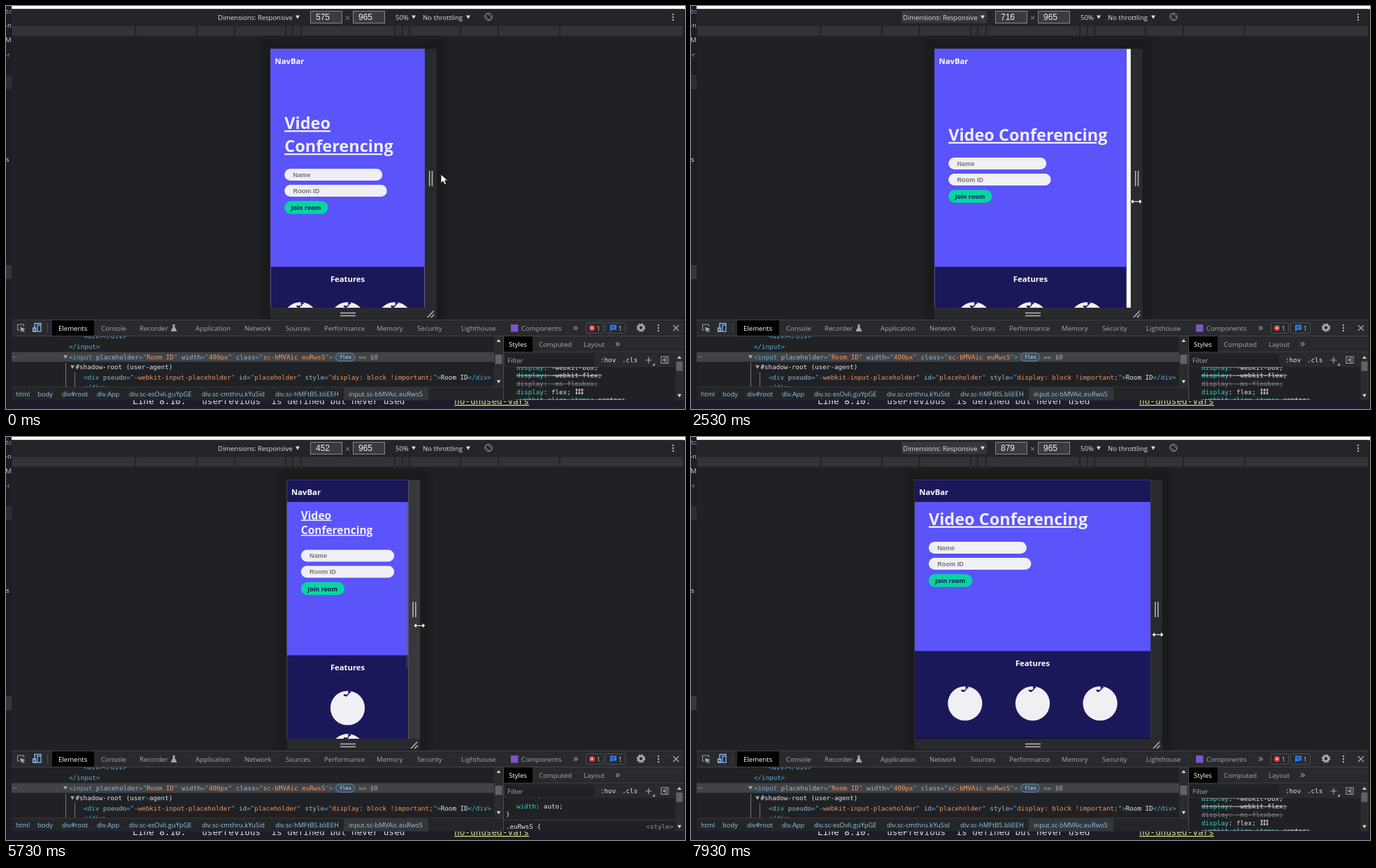
An HTML page for the animation above (8000 ms loop, 971 px wide and 577 px high).

```html
<!DOCTYPE html>
<html lang="en">
<head>
<meta charset="utf-8">
<title>Responsive resize</title>
<style>
html, body { margin: 0; width: 100%; height: 100%; overflow: hidden; background: #1e1c28; }
svg { display: block; width: 100vw; height: 100vh; }
text { white-space: pre; }
.ui { font: 9.6px "Open Sans", "Noto Sans", sans-serif; }
.bold { font: bold 11.3px "Open Sans", "Noto Sans", sans-serif; }
.code { font: 9.23px "DejaVu Sans Mono", monospace; }
.term { font: 12.7px "DejaVu Sans Mono", monospace; }
.field { font: 12px "Liberation Sans", Arial, sans-serif; }
.pill { font: bold 9.2px "Liberation Sans", Arial, sans-serif; }
.strike { text-decoration: line-through; }
</style>
</head>
<body>
<svg id="stage" viewBox="0 0 971 577" preserveAspectRatio="none">
  <defs>
    <filter id="soft" x="-10%" y="-10%" width="120%" height="120%"><feGaussianBlur stdDeviation="4"/></filter>
    <clipPath id="viewClip"><rect id="viewRect" y="61.5" height="370.5"/></clipPath>
    <clipPath id="treeClip"><rect x="8" y="473" width="690" height="72.5"/></clipPath>
    <clipPath id="paneClip"><rect x="712" y="517.5" width="246" height="46.5"/></clipPath>
    <clipPath id="edgeClip"><rect width="8" height="577"/></clipPath>
  </defs>
  <g id="back"></g>
  <g id="device">
    <rect id="shade" y="46" height="404" rx="6" fill="#000" opacity=".16" filter="url(#soft)"/>
    <rect id="bottomBar" y="432" height="15.5" fill="#292a2d"/>
    <rect id="sideBar" y="61.5" height="370.5" width="17"/>
    <path d="M478 439.5h22M478 443.5h22" stroke="#b9bbbe" stroke-width="1.5"/>
    <path id="grip" d="M6.8 236v22M10.7 236v22M4 446l9-9.500M9 446l4.500-4.500" stroke="#b9bbbe" stroke-width="1.5"/>
    <g clip-path="url(#viewClip)">
      <rect x="200" y="61" width="600" height="372" fill="#fff"/>
      <g id="page"></g>
    </g>
  </g>
  <g id="chrome"></g>
  <g id="cursor">
    <path id="arrow" d="M0 0v12.500l3-2.800 2.200 4.800 2.300-1-2.200-4.600h4.200z" fill="#fff" stroke="#111" stroke-width=".7"/>
    <path id="resize" d="M-8.500 0l4.500-4v3h8v-3l4.500 4-4.500 4v-3h-8v3z" fill="#fff" stroke="#111" stroke-width=".8"/>
    <circle id="touch" r="11" fill="#1f1f47" fill-opacity=".62" stroke="#8581c8" stroke-opacity=".8"/>
  </g>
</svg>
<script>
const $ = id => document.getElementById(id);
const esc = s => String(s).replace(/&/g, '&amp;').replace(/</g, '&lt;');
const rect = (x, y, w, h, fill, more = '') =>
  `<rect x="${x}" y="${y}" width="${w}" height="${h}" fill="${fill}" ${more}/>`;
const line = (d, color, w = 1, fill = 'none') =>
  `<path d="${d}" fill="${fill}" stroke="${color}" stroke-width="${w}"/>`;
const text = (x, y, s, fill = '#dfe1e5', cls = 'ui', more = '') =>
  `<text x="${x}" y="${y}" class="${cls}" fill="${fill}" ${more}>${esc(s)}</text>`;

const TAG = '#5db0d7', ATTR = '#9bbbdc', VAL = '#f29766', PROP = '#35d4c7', LIGHT = '#e4e6ea', DIM = '#8f9297';

// Parts alternate colour and string.
function code(x, y, ...parts) {
  let spans = '';
  for (let i = 0; i < parts.length; i += 2) spans += `<tspan fill="${parts[i]}">${esc(parts[i + 1])}</tspan>`;
  return `<text x="${x}" y="${y}" class="code">${spans}</text>`;
}
const attr = (name, value) => [ATTR, ' ' + name, TAG, '="', VAL, value, TAG, '"'];
const triangle = (x, y, s = 3, fill = '#dfe1e5') => `<path d="M${x - s} ${y - s * .8}h${s * 2}l${-s} ${s * 1.6}z" fill="${fill}"/>`;
const upArrow = (x, y) => `<path d="M${x - 3} ${y + 2}h6l-3-4z" fill="#d0d2d5"/>`;

function drawBack() {
  let s = rect(0, 0, 971, 577, '#1e1c28') + rect(0, 99, 8, 20, '#2c2c38') + rect(0, 371, 8, 20, '#34353d');
  s += '<g clip-path="url(#edgeClip)">' + text(0, 11, 'to', '#7fa8c8') + text(-1, 31, '-n', '#c8c8d0') +
    text(-1, 52, 'Mu', '#c8c8d0') + text(-1, 73, '-r', '#55c46a') + text(0, 223, 's', '#e8e8e8') + '</g>';
  s += text(181, 570, 'Line 8:10:', '#eceaf0', 'term', 'font-weight="bold"') +
    text(272.5, 570, "'usePrevious' is defined but never used", '#dddce4', 'term') +
    text(641, 570, 'no-unused-vars', '#dfe08c', 'term', 'text-decoration="underline"');
  s += rect(8, 0, 963, 4.5, '#fff') + rect(8, 4.5, 961, 560, '#202124') + rect(8, 4.5, 961, 23, '#242528') +
    rect(9, 28.5, 959, 14, '#333437');
  const ticks = [185.5, 273, 327, 400, 410, 422, 556, 567, 577, 650, 704, 792];
  s += line(ticks.map(x => `M${x} 29v13`).join(''), '#17181a', 1.2);
  s += `<rect id="dimHover" x="301" y="7" width="122" height="17.5" fill="#36373b"/>`;
  s += text(303, 19.7, 'Dimensions: Responsive', '#dfe1e5', 'ui', 'style="font-size:9.45px"') + triangle(417, 16);
  s += rect(435.5, 7.5, 45, 17, '#3a3b3e', 'stroke="#85878b"') + rect(496.5, 7.5, 45, 17, '#3a3b3e', 'stroke="#85878b"');
  s += '<text id="widthText" x="443" y="19.8" class="field" fill="#f1f1f1"></text>' + text(504, 19.8, '965', '#f1f1f1', 'field');
  s += line('M486 14.500l5 5M491 14.500l-5 5', '#a0a2a6');
  s += text(557, 19.7, '50%') + triangle(583, 16) + text(596, 19.7, 'No throttling') + triangle(661, 16);
  s += '<rect x="-4.500" y="-2.700" width="9" height="5.400" rx="1" fill="none" stroke="#85888c" transform="translate(690 15.500) rotate(45)"/>' +
    '<circle cx="690" cy="15.500" r="5.300" fill="none" stroke="#85888c"/>';
  s += dots(954, 16);
  $('back').innerHTML = s;
}

const dots = (x, y) => [-4, 0, 4].map(d => `<circle cx="${x}" cy="${y + d}" r="1.200" fill="#b4b6ba"/>`).join('');

function drawChrome() {
  let s = rect(8, 449, 961, 24, '#292a2d') + line('M8 449.500h961M8 472.500h961', '#4a4c50', .8) +
    rect(66, 450, 60, 22, '#000');
  s += line('M19.500 464h-3v-8h9v3', '#a4a6aa') + '<path d="M20 459.500l8 3-3.300 1.200 2 2.500-1.400 1-1.900-2.600-1.400 2.600z" fill="#a4a6aa"/>';
  s += line('M41 463v-8.500h9v2M38 466h6', '#8ab4f8', 1.4) + rect(45, 457, 5, 9, 'none', 'stroke="#8ab4f8" stroke-width="1.300"') +
    line('M38.500 465v-4h4v4z', '#8ab4f8', 1.3) + line('M59.500 454v14', '#4a4c50');
  const tabs = [['Console', 136], ['Recorder', 191], ['Application', 271], ['Network', 341], ['Sources', 400],
    ['Performance', 455], ['Memory', 530], ['Security', 588], ['Lighthouse', 651], ['Components', 737]];
  s += text(75, 464.8, 'Elements', '#fff') + tabs.map(([n, x]) => text(x, 464.8, n, '#a6a9ae')).join('');
  s += '<path d="M238 456.500h4M239 456.500v3l-3 6h8l-3-6v-3z" fill="#a6a9ae" stroke="#a6a9ae" stroke-width=".8"/>';
  s += rect(722, 456, 10.5, 10.5, '#7d55c7') + text(811, 465, '»', '#a6a9ae', 'ui', 'style="font-size:15px"');
  for (const x of [829.5, 857.5]) s += rect(x, 453.5, 28 - (x < 850 ? 3 : 0), 15, 'none', 'rx="2" stroke="#4c4e52"');
  s += '<circle cx="838" cy="461" r="4" fill="#e3403c"/>' + line('M836.500 459.500l3 3M839.500 459.500l-3 3', '#fff') +
    text(844.5, 464.8, '1', '#c3c5c9') + '<path d="M864 456.500h9v7h-6l-3 2.500z" fill="#2f7df4"/>' +
    line('M866 459h5M866 461h4', '#202124', .8) + text(875.5, 464.8, '1', '#c3c5c9');
  s += '<circle cx="908" cy="460.500" r="3.700" fill="none" stroke="#a6a9ae" stroke-width="2.800"/>' +
    '<circle cx="908" cy="460.500" r="5.500" fill="none" stroke="#a6a9ae" stroke-width="1.500" stroke-dasharray="2.500 1.820"/>' +
    dots(933, 461) + line('M954 457l8 8M962 457l-8 8', '#a6a9ae', 1.3);

  s += rect(8, 473, 703, 73, '#202124') + rect(8, 495.5, 690, 14, '#424346');
  s += '<g clip-path="url(#treeClip)">' + code(111, 476, TAG, '<div></div>') + code(90, 491, TAG, '</input>') +
    code(90, 505.7, TAG, '<input', ...attr('placeholder', 'Room ID'), ...attr('width', '400px'),
      ...attr('class', 'sc-bMVAic euRwsS'), TAG, '>') +
    code(99.5, 520.3, LIGHT, '#shadow-root (user-agent)') +
    code(111, 535, TAG, '<div', ...attr('pseudo', '-webkit-input-placeholder'), ...attr('id', 'placeholder'),
      ...attr('style', 'display: block !important;'), TAG, '>', LIGHT, 'Room ID', TAG, '</div>') +
    code(111, 549, TAG, '</div>') + line('M85.500 511v36M98.500 524v23', '#7f8287', .9) + '</g>';
  s += triangle(85, 502.5, 3, '#a6a9ae') + triangle(95, 517, 3, '#a6a9ae') + text(9, 504.5, '•••', '#a6a9ae', 'ui', 'style="font-size:6px"');
  s += rect(471.5, 497, 27, 11.5, '#3f5061', 'rx="5.700" stroke="#7199bb" stroke-width=".8"') +
    text(477, 505.3, 'flex', '#e3e6e9', 'code', 'style="font-size:7px"') +
    text(504, 505.7, '== $0', '#a9abaf', 'code', 'font-style="italic"');
  s += rect(698, 473, 13, 73, '#2b2c2f') + rect(699.5, 499, 10, 13.5, '#606266') + upArrow(704.5, 479) + triangle(704.5, 538, 2.7);
  s += rect(8, 546, 703, 18.5, '#242528') + rect(483, 546, 121, 18.5, '#34363a') + line('M8 545.700h703', '#3b3d41', .8);
  [['html', 14], ['body', 45], ['div#root', 80], ['div.App', 130], ['div.sc-esOvli.guYpGE', 176], ['div.sc-cmthru.kYuSid', 280],
    ['div.sc-hMFtBS.bliEEH', 385], ['input.sc-bMVAic.euRwsS', 490]].forEach(([n, x]) => { s += text(x, 558.8, n, '#8fc8ee', 'ui', 'style="font-size:9.400px"'); });

  s += rect(711, 473, 258, 91.5, '#202124') + rect(712, 473, 257, 22, '#292a2d') + rect(712, 473, 41, 22, '#000') +
    line('M711.500 473v91', '#4a4c50') + line('M712 495.500h257', '#45474b', .8);
  s += text(719, 487.6, 'Styles', '#fff') + text(762, 487.6, 'Computed', '#a6a9ae') + text(826, 487.6, 'Layout', '#a6a9ae') +
    text(871, 488, '»', '#a6a9ae', 'ui', 'style="font-size:15px"');
  s += rect(712, 497, 257, 20, '#292a2d') + rect(714, 498.5, 127, 17, '#202124') + text(717, 511, 'Filter', '#a6a9ae') +
    code(850, 510, LIGHT, ':hov') + code(881, 510, LIGHT, '.cls') + line('M914.500 507h9M919 502.500v9', '#a6a9ae', 1.2) +
    '<path d="M928 511v4h-4z" fill="#a6a9ae"/>' + rect(937, 502, 10, 9.5, 'none', 'stroke="#a6a9ae"') +
    line('M944 502v9.500', '#a6a9ae') + '<path d="M942.500 504v5.500l-3.500-2.700z" fill="#a6a9ae"/>';
  s += rect(957.5, 496, 11.5, 68.5, '#2b2c2f') + rect(958.5, 509, 9, 13.5, '#606266') + upArrow(963, 503) + triangle(963, 558, 2.7);
  const rule = (y, prop, val, cls = '', color) => `<g class="${cls}">` + code(730, y, color || PROP, prop, color || LIGHT, ': ' + val) +
    (cls ? line(`M730 ${y - 3}h${(prop.length + val.length + 2) * 5.56}`, color || LIGHT, .8) : '') + '</g>';
  s += '<g clip-path="url(#paneClip)"><g id="paneWide">' + rule(520.5, 'display', '-webkit-box;', 'x') +
    rule(532, 'display', '-webkit-flex;', 'x') + rule(544, 'display', '-ms-flexbox;', 'x', '#85888c') + rule(555.7, 'display', 'flex;') +
    line('M816 548v8M820 548v8M824 548v8', '#b3b5b9', 2.4) + line('M814 552h12', '#202124', 1) +
    rule(567, '-webkit-align-items', 'center;', 'x') + '</g>';
  s += '<g id="paneSmall">' + code(715, 517, LIGHT, '.bliEEH {') + rule(531.7, 'width', 'auto;') + code(715, 543, LIGHT, '}') +
    line('M712 548.500h246', '#45474b', .8) + code(715, 561, LIGHT, '.euRwsS {') + code(915.5, 561, DIM, '<style>') + '</g>';
  s += '<g id="paneInput">' + code(715, 521, LIGHT, '}') + line('M712 526.500h246', '#45474b', .8) + code(715, 537.3, LIGHT, 'input {') +
    text(837, 537.3, 'user agent stylesheet', DIM, 'code', 'font-style="italic"') +
    `<g font-style="italic">` + rule(551, '-webkit-writing-mode', 'horizontal-tb') + code(747, 562.3, LIGHT, '!important;') + '</g></g></g>';
  $('chrome').innerHTML = s;
}

// Linear keyframes given as [time, value] pairs.
function at(keys, t) {
  let i = keys.findIndex(k => k[0] > t);
  if (i < 0) return keys[keys.length - 1][1];
  if (!i) return keys[0][1];
  const [a, u] = keys[i - 1], [b, v] = keys[i];
  return u + (v - u) * (t - a) / (b - a);
}

const WIDTH = [[470, 575], [1333, 1121], [1700, 1277], [2200, 866], [2533, 716], [3000, 485], [3600, 452], [5930, 452],
  [6200, 448], [6500, 448], [7067, 751], [7333, 900], [7600, 1077], [7880, 879]];
const OFFSET = [[200, 12], [1333, 15], [2000, 10], [2533, 8], [3600, 12], [5733, 16], [7067, 17], [7880, 10.5]];
const CURSOR_Y = [[200, 247], [1333, 267], [2533, 280], [4000, 272], [4467, 279], [4800, 217], [4930, 220], [5070, 220],
  [5350, 201], [5733, 270], [7067, 283]];
const ROAM_X = [[4000, 587], [4200, 510], [4467, 480], [4800, 492], [4930, 499], [5350, 499], [5733, 591]];
const NAV = [[5130, 0], [5500, 1], [6600, 1], [6950, .25], [7067, .25], [7320, 1]];
const SCROLL = [[5070, 0], [5350, 19]];

const SCALE = .3836, MID = 488.5, BREAK = 480;
const BLUE = '#5a54fa', NAVY = '#1b1859', PALE = '#f0eff4';

function circle(x, y) {
  return `<g transform="translate(${x} ${y})"><circle r="24.600" fill="${PALE}"/>` +
    `<path d="M-4 -18.300q5.500 .8 6.500-5.400" fill="none" stroke="${NAVY}" stroke-width="1.500"/>` +
    `<path d="M-4.500 -18.500l2.600 .8M1.500 -23.300l2.200 .4" stroke="${NAVY}" stroke-width="2.400" stroke-linecap="round"/></g>`;
}

function drawPage(left, w, small, scroll, nav, t) {
  const one = w * .999 >= 268, x = left + 20, mid = left + w / 2;
  const top = small ? 331.5 : 373.5;
  const boxY = small ? 180.5 : one ? 217 : 233;
  const size = small ? 15.5 : 23.5;
  const title = (y, s) => text(x, y, s, PALE, 'bold', `style="font-size:${size}px" text-decoration="underline"`);
  let s = rect(left, 61, w, 600, NAVY) + rect(left, 61, w, top - 61, BLUE);
  if (small) s += title(136.5, 'Video') + title(158, 'Conferencing');
  else if (one) s += title(192.7, 'Video Conferencing');
  else s += title(176, 'Video') + title(209, 'Conferencing');
  const field = (y, fw, label) => rect(x, y, small ? w - 40 : fw, 17, PALE, 'rx="8.500"') + text(x + 12.3, y + 11.8, label, '#757575', 'pill');
  s += field(boxY, 140, 'Name') + field(boxY + 23, 146.5, 'Room ID') +
    rect(x, boxY + 46.3, 62.3, 18.5, '#06d6a0', 'rx="9.200"') +
    text(x + 9.4, boxY + 59, 'Join room', NAVY, 'bold', 'style="font-size:8.900px"');
  s += text(mid, top + 21.6, 'Features', '#fff', 'bold', 'text-anchor="middle"');
  const gap = w / 4 + 12.3;
  for (let i = 0; i < 3; i++) s += small ? circle(mid, top + 75.5 + i * 61.7) : circle(mid + (i - 1) * gap, top + 75);
  s += rect(left, small ? 580 : 497.5, w, 20, '#100e38');
  s = `<g transform="translate(0 ${-scroll})">${s}</g>`;
  if (small && t > 5100 && t < 5930) s += rect(left + w - 2.5, 61 + scroll * .7, 1.5, 256, '#56548c', 'opacity=".6"');
  s += rect(left, 61, w, 32, NAVY, `opacity="${nav}"`) + text(left + 6.3, 82.7, 'NavBar', '#fff', 'bold');
  $('page').innerHTML = s;
}

const put = (id, o) => { for (const k in o) $(id).setAttribute(k, o[k]); };
const show = (id, on) => put(id, { display: on ? 'inline' : 'none' });

function render(now) {
  const step = 8000 / 120;
  const t = Math.floor((now % 8000 + 5) / step) * step;
  const css = at(WIDTH, t), small = css < BREAK;
  // While shrinking, the outer frame trails the page by a moment.
  const outer = Math.max(css, at(WIDTH, t - 35)) * SCALE;
  const left = MID - outer / 2, right = left + outer;
  const drag = t >= 470 && t < 4030 || t >= 5860;
  const scroll = small ? at(SCROLL, t) : t > 5350 ? 67 : 0;

  $('widthText').textContent = Math.round(css);
  show('dimHover', drag);
  put('viewRect', { x: left, width: outer });
  put('shade', { x: left - 14, width: outer + 45 });
  put('bottomBar', { x: left, width: outer + 17 });
  put('sideBar', { x: right, fill: t > 5690 && t < 5860 ? '#37383b' : '#292a2d' });
  put('grip', { transform: `translate(${right} 0)` });
  drawPage(left, css * SCALE, small, scroll, at(NAV, t), t);

  const input = t > 6800 && t < 7200, narrow = small || t > 6500 && t <= 6800;
  show('paneWide', !narrow && !input);
  show('paneSmall', narrow && !input);
  show('paneInput', input);

  const start = t < 195, roam = t >= 4000 && t < 5733;
  const x = start ? (t < 130 ? 622 : 616) : roam ? at(ROAM_X, t) : right + at(OFFSET, t);
  const y = start ? 241 : at(CURSOR_Y, t);
  const touch = roam && x < right;
  put('cursor', { transform: `translate(${x} ${y})` });
  show('arrow', start);
  show('touch', touch);
  show('resize', !start && !touch);
}

drawBack();
drawChrome();
const begin = performance.now();
function tick() {
  render(performance.now() - begin);
  requestAnimationFrame(tick);
}
tick();
</script>
</body>
</html>
```
